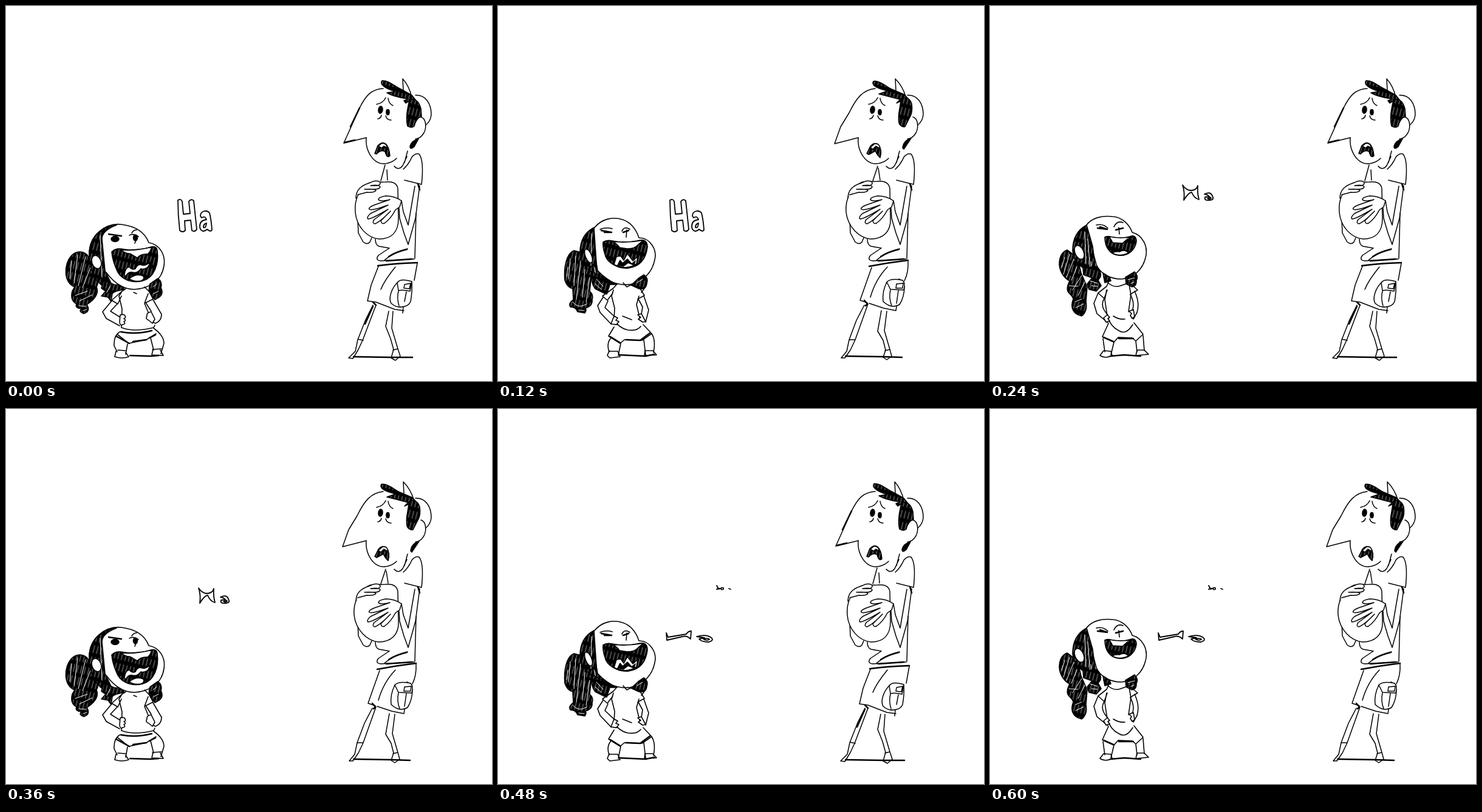
Recreate the animation shown at these times as an HTML page. Size 800 px wide and 618 px high, loop 0.72 s.

```html
<!DOCTYPE html>
<html lang="en">
<head>
<meta charset="utf-8">
<title>Ha</title>
<style>
html, body { margin: 0; height: 100%; overflow: hidden; background: #fff }
svg { display: block; width: 100%; height: 100% }
path, ellipse { fill: none; stroke: #000; stroke-width: 1.5; stroke-linecap: round; stroke-linejoin: round }
#girl path { stroke-width: 1.6 }
#laugh path { stroke-width: 1.8 }
.w { fill: #fff }
.k { fill: #000 }
.i { fill: url(#ink) }
path.b, #girl .b { stroke-width: 2.5 }
#girl .s { stroke: #fff; stroke-width: 1 }
</style>
</head>
<body>
<svg viewBox="0 0 800 618">
<defs>
  <pattern id="ink" width="6" height="19" patternUnits="userSpaceOnUse" patternTransform="rotate(14)">
    <rect width="6" height="19"/>
    <path d="M2 1V13" style="stroke:#fff;stroke-width:.6"/>
  </pattern>
</defs>

<!-- Tall figure: steady parts -->
<g>
  <path d="M593 217C591 238 604 260 622 260Q635 259 643 251"/>
  <path d="M610 162Q621 160 625 151M629 152Q630 161 637 164M612 186Q617 185 618 180M625 181Q627 188 634 188"/>
  <ellipse class="k" cx="616.5" cy="171" rx="3.5" ry="6" transform="rotate(8 616 171)"/>
  <ellipse class="k" cx="628.5" cy="175" rx="2.6" ry="4.5"/>
  <path d="M674 147C690 146 700 160 700 179Q699 190 691 196"/>
  <path d="M683 183C691 185 693 199 688 209Q682 219 674 219"/>
  <path d="M661 239L656 258M639 264Q646 272 653 263L660 248"/>
  <path d="M654 269Q663 261 668 249Q674 242 680 244C687 253 686 276 684 294M656 287L684 294"/>
  <path d="M678 293L681 303" class="b"/>
  <path d="M579 352L580 374L588 389Q595 394 599 389L602 382"/>
  <path d="M675 342L673 416"/>
  <path d="M608 384Q608 394 614 396L631 399L613 411Q607 419 617 420L672 417M661 400Q636 407 623 419"/>
  <path class="b" d="M660 401Q642 405 630 413M626 420L668 417"/>
</g>

<!-- Tall figure: two wobbling versions -->
<g id="man">
  <g>
    <path d="M621 136C601 137 592 148 582 168L556 226L593 217"/>
    <path class="b" d="M582 168L567 199M557 225L574 221"/>
    <path d="M654 139L653 120Q664 132 668 151"/>
    <path class="i" d="M619 123C629 122 639 132 652 138L668 147L676 157L668 154L658 160L655 156L662 153C648 151 635 148 627 143L640 141Q613 132 619 123Z"/>
    <path class="i" d="M664 155Q678 150 683 169L684 182Q675 185 672 198Q667 202 661 198C657 183 662 165 664 155Z"/>
    <path class="k" d="M679 219L672 232Q665 238 665 231Q667 222 679 219Z"/>
    <path class="i" d="M607 243L612 230Q619 223 625 227Q631 233 632 247Q627 252 624 240Q617 236 610 244Z"/>
    <path class="w" d="M613 231L619 226Q626 226 628 234L622 231L618 234Z"/>
    <path d="M624 262L617 288M627 270L628 287"/>
    <path class="w" d="M600 291C582 297 573 320 575 340C577 363 594 382 614 384C635 384 646 372 646 350L645 301Q643 288 625 290Z"/>
    <path class="b" d="M612 428Q642 424 677 423"/>
    <path d="M613 429L601 460L595 486L609 488M609 488L640 500L655 502M677 424L672 452M641 430Q623 452 617 467M654 495L653 506"/>
    <path class="b" d="M604 488L609 493"/>
    <path class="w" d="M644 456C635 465 629 481 634 490Q642 497 651 496Q663 495 666 487Q669 470 668 456Z"/>
    <path class="w" d="M644 456Q649 448 668 454L665 470Q653 467 646 469ZM656 459L666 457L664 466L655 465Z"/>
    <path d="M646 470Q643 481 647 494M659 471L656 487"/>
    <path d="M604 493L592 517L579 550L575 569L564 580L571 581L580 566L587 551L609 493M579 549L588 551"/>
    <path class="b" d="M604 495L591 524M572 578L634 579L669 579"/>
    <path d="M630 503L625 528L633 548L638 566L634 580L641 584L649 577L645 565L635 531L637 503M637 567L645 565"/>
  </g>
  <g>
    <path d="M621 136C601 138 590 151 578 176L564 199L554 227L593 217"/>
    <path d="M655 139L654 120Q666 132 671 149"/>
    <path class="i" d="M618 124C627 122 638 132 648 137L669 146L679 157L667 155L656 160L662 154L627 145L641 140Q612 133 618 124Z"/>
    <path class="i" d="M663 153Q676 147 681 161Q683 175 678 183L670 199Q663 200 660 193C657 178 663 167 663 153Z"/>
    <path class="k" d="M680 218L668 236L666 234Q667 222 680 218Z"/>
    <path class="i" d="M607 243L613 231Q619 224 626 228Q633 237 629 250Q625 247 621 239L610 245Z"/>
    <path class="w" d="M613 233L620 227Q628 226 629 235L622 231L617 236Z"/>
    <path d="M625 264L617 288M626 267L629 287"/>
    <path class="w" d="M600 290C582 297 571 318 573 340C576 364 594 382 613 384C634 384 647 372 646 350L645 301Q643 287 624 289Z"/>
    <path class="b" d="M611 429Q642 423 675 419"/>
    <path d="M615 431L603 465L596 485L608 489M611 490L635 498L655 502L656 495M675 420Q676 439 669 453M641 430Q621 451 613 480"/>
    <path class="b" d="M603 485L608 491L605 494"/>
    <path class="w" d="M640 455Q632 471 634 487Q648 500 661 492Q669 479 669 462L661 450Z"/>
    <path class="w" d="M640 455Q646 448 666 452Q671 457 668 468L646 467ZM656 458L667 457L666 465L655 465Z"/>
    <path d="M646 468Q643 481 648 494M659 469L656 490"/>
    <path d="M603 493L590 518L578 550L574 569L565 580L571 580L580 567L588 550L609 491M578 550L587 550"/>
    <path class="b" d="M572 577L634 578L665 579"/>
    <path d="M631 502L625 536L634 551L638 567L634 579L640 583L648 577L645 566L636 535L640 503M637 568L645 566"/>
  </g>
</g>

<!-- Hands and near arm -->
<g>
  <path class="w" d="M576 317C576 304 583 296 600 291Q606 287 614 289Q619 293 612 296L600 296Q614 294 616 298Q615 302 606 302L590 302Q608 301 609 304Q606 308 594 307L579 311"/>
  <path class="w" d="M648 331L651 321Q640 313 625 313Q613 315 613 319Q616 323 632 319L606 328Q596 332 598 335Q602 338 629 328L600 342Q593 348 596 351Q602 351 629 335L606 352Q602 358 607 359Q617 355 633 338L617 354Q618 360 623 358Q634 350 641 336L648 331"/>
  <path d="M651 321L654 339L662 361L673 297M647 333L648 350L655 374L662 393L674 350L681 296"/>
</g>

<!-- Laughing girl: crouch, bounce, stretch -->
<g id="girl">
  <g>
    <path class="i" d="M108 411C119 400 136 405 138 420L147 446Q154 455 149 463Q154 475 140 487L133 492Q140 503 128 507Q119 504 124 499Q113 498 116 491Q105 485 109 470L113 463C95 457 94 426 108 411Z"/>
    <path class="s" d="M108 420L105 449M118 410L112 457M131 413L119 461M139 431L126 464M114 477L134 470M121 486L142 476M120 494L131 495M127 502L133 500"/>
    <path class="w" d="M137 410C136 378 164 357 190 360C215 363 229 374 235 390C253 393 263 410 260 428C257 448 243 459 228 464C199 474 178 457 165 439Z"/>
    <path class="i" d="M137 413C136 386 150 365 182 361Q158 370 158 384L163 436L175 461Q167 468 160 462C144 451 138 431 137 413Z"/>
    <path class="s" d="M155 378L158 447M160 383L165 438"/>
    <ellipse class="w" cx="149" cy="422" rx="7.5" ry="11" transform="rotate(-20 149 422)"/>
    <path class="i" d="M161 452L178 459Q190 459 195 467L186 469Q179 470 175 474L173 487L168 480L157 478L164 470L157 465Z"/>
    <path class="i" d="M237 458L250 449Q258 455 255 464Q260 474 252 480L245 484L239 476Q233 470 237 458Z"/>
    <path class="s" d="M166 472L171 462M242 463L248 458M243 474L251 470"/>
    <path class="b" d="M169 376L190 379"/>
    <ellipse class="k" cx="179.500" cy="384" rx="6.500" ry="4.500"/>
    <ellipse class="k" cx="213" cy="382" rx="3.5" ry="5"/>
    <path d="M203 378Q208 374 218 380M207 374Q210 369 215 369M214 386L212 391"/>
    <path class="i" d="M174 405C185 396 193 402 205 402Q229 401 239 397Q248 395 249 403C252 425 244 448 225 453C205 458 187 450 181 432Q175 418 174 405Z"/>
    <path class="w" d="M190 402Q196 408 204 408L216 415Q223 408 233 409Q238 405 240 397Q215 404 190 402Z"/>
    <path class="w" d="M195 443Q196 431 203 430Q208 436 213 433Q217 424 224 427Q230 429 239 421L233 431Q226 435 222 433Q216 441 209 439Q201 437 197 446Z"/>
    <path class="w" d="M203 449Q215 440 226 445Q229 450 222 453Q210 455 203 449Z"/>
    <path d="M197 466L191 470L174 485L184 491L190 478M191 470L186 478L191 499L190 530M190 530Q211 538 243 530L245 526M228 463L236 471L242 483L230 489M234 474L228 490L235 507M210 472L215 474"/>
    <path d="M174 486L159 504L165 515L187 527M183 491L172 503L188 513"/>
    <path class="w" d="M188 509Q195 507 196 511Q198 514 194 515Q199 518 194 520Q198 524 192 525Q188 528 187 521Z"/>
    <path d="M242 484L256 508Q256 519 246 523L240 520M230 489L239 503"/>
    <path class="w" d="M239 504Q231 505 232 511Q229 516 235 518L241 523L245 516Z"/>
    <path class="b" d="M189 537Q214 542 240 535"/>
    <path d="M187 537Q177 544 178 560L183 570M183 541L202 556L231 550L247 540M243 531Q260 543 260 556L255 573M200 557L197 574M238 547L243 567"/>
    <path class="b" d="M181 544L203 556M209 553L231 550M236 547L246 542"/>
    <path d="M181 569L179 578Q191 582 202 578L197 571M184 567L197 568M242 566L240 575L259 576L254 567M241 566L256 565"/>
    <path class="b" d="M204 576L238 577L251 576"/>
  </g>
  <g>
    <path class="i" d="M125 403C112 408 108 432 110 452Q114 464 123 466L124 484Q115 490 119 496Q128 496 131 504L143 506Q147 500 143 498Q156 495 155 484Q158 476 151 470L154 440L137 406Z"/>
    <path class="s" d="M119 416L116 450M128 412L125 461M136 420L129 483M143 434L139 480M151 447L145 488M123 488Q133 500 146 491M115 430L113 446M133 501L142 502"/>
    <path class="w" d="M158 366C171 350 190 347 205 352C220 357 228 370 232 382C251 382 262 402 258 418C253 444 230 462 204 459Q180 456 163 438Z"/>
    <path class="i" d="M158 365C141 374 135 388 135 406C136 422 145 435 160 442L167 464L179 475L184 459L196 459Q177 450 164 436Q157 401 158 365Z"/>
    <path class="s" d="M154 375L153 428M158 430L164 451M167 447L181 463"/>
    <ellipse class="w" cx="149" cy="412" rx="5" ry="12" transform="rotate(-22 149 412)"/>
    <path class="i" d="M154 437L166 444L180 451L183 463L176 474L160 466Q152 456 154 437Z"/>
    <path class="i" d="M231 449L240 443Q248 448 245 457Q244 468 232 466L219 460Z"/>
    <path class="s" d="M162 450L173 462M160 458L170 467M229 456L238 450"/>
    <path d="M168 368Q178 364 188 367M204 371Q208 362 217 368M212 369L211 381"/>
    <path class="b" d="M170 370L187 373L175 373M206 373L215 370"/>
    <path class="i" d="M173 389Q179 385 188 387Q207 391 229 387Q246 382 246 397C244 414 236 429 215 432C197 434 178 422 176 409Q172 397 173 389Z"/>
    <path class="w" d="M187 388Q196 391 200 398L213 400Q226 400 231 393L239 386Q213 391 187 388Z"/>
    <path class="w" d="M191 426L195 413L202 412L207 419L213 408L222 420L230 413L228 425Q211 436 191 426Z"/>
    <path class="k" d="M197 427L201 419L205 424L213 417L220 425L226 420L224 427L214 423L206 429Z"/>
    <path d="M196 458L190 465L172 478L180 485L189 473M190 468L187 478L192 498L191 517Q199 531 214 534Q229 536 235 528M206 456L212 463L220 459L230 463L242 464L236 472M231 461L241 477L230 483M232 478L228 492L233 513M205 511L220 517"/>
    <path d="M173 480L164 494L168 505L186 524L197 525M181 486L176 497L192 512"/>
    <path class="w" d="M191 511L197 514L194 518L199 520L195 525L186 524Z"/>
    <path d="M240 478L248 501L243 521M231 483L238 496L236 508"/>
    <path class="w" d="M236 507L230 509L235 513L231 516L238 521L243 520Z"/>
    <path d="M191 529L182 544L201 556L208 550L237 551L253 540L239 525M186 547Q178 556 183 570M253 540Q260 551 256 571M202 556L198 576M240 550L243 575"/>
    <path class="b" d="M185 545L201 555M211 550L234 551L250 539"/>
    <path d="M183 568L180 576L184 580L201 578L197 569L183 569M242 568L241 576L261 575L255 568Z"/>
    <path class="b" d="M200 575L243 577L257 574"/>
  </g>
  <g>
    <path class="i" d="M127 402Q114 407 114 426C115 440 124 450 131 453Q124 467 130 473Q137 480 137 483C131 498 138 508 151 511Q161 503 158 487L160 463L150 440L144 415Z"/>
    <path class="s" d="M123 414L118 431M131 409L121 442M138 417L126 447M143 430L134 452M151 444L136 468M156 455L145 477M141 487L151 483M141 497L154 491M130 461L145 462"/>
    <path class="w" d="M158 362C167 349 184 345 202 347C218 348 230 361 234 373C252 378 259 396 257 410C253 435 235 449 216 450C196 450 181 440 175 426Z"/>
    <path class="i" d="M159 361C142 370 136 386 136 403C137 418 147 429 156 433L165 445Q175 451 180 440L173 429L169 396Z"/>
    <path class="s" d="M156 372L158 425M161 384L165 437M166 421L168 439"/>
    <ellipse class="w" cx="147" cy="406" rx="7" ry="12" transform="rotate(-24 147 406)"/>
    <path class="i" d="M153 432L175 429Q184 437 182 446L178 452L183 461L175 470L163 467L160 458L168 448L154 443Z"/>
    <path class="i" d="M186 440L197 447L199 453L189 456ZM223 447L238 438Q245 445 241 452Q242 461 234 463L224 458Z"/>
    <path class="s" d="M165 453L177 457M167 461L177 462M227 451L238 448M230 458L237 455"/>
    <path d="M175 361Q186 358 194 366M204 364Q209 353 219 357M212 365L213 376"/>
    <path class="b" d="M177 366L193 368L181 364M207 369L219 366"/>
    <path class="i" d="M189 381Q193 378 201 381Q220 384 233 379Q241 378 241 388C239 403 227 412 212 411C197 410 189 397 189 381Z"/>
    <path class="w" d="M196 380Q200 386 202 390L218 391L226 384L237 380Q215 384 196 380Z"/>
    <path class="w" d="M201 407Q207 404 213 405Q222 400 228 407Q213 414 201 407Z"/>
    <path d="M187 447L195 455L192 462L178 473L188 482L193 468M194 456Q204 465 215 461L229 456L243 468L231 475M192 468L189 484L193 511Q198 528 212 535Q224 543 235 525M229 459L232 476L228 504M203 511Q212 517 222 516"/>
    <path d="M178 473L171 490L176 507L194 522M188 482Q180 495 194 509"/>
    <path class="w" d="M193 509L197 513L194 515L197 519L191 521L187 514Z"/>
    <path d="M238 470Q247 489 242 505L236 516M231 476Q238 488 235 499"/>
    <path class="w" d="M236 500L229 503L233 507L231 510L234 515L238 512Z"/>
    <path d="M195 523L185 545L204 554L211 546L234 547L240 552L252 541L237 522M186 548L189 570M204 554L199 575M240 552L242 570M252 543L254 568"/>
    <path class="b" d="M187 546L203 553M212 548L236 548"/>
    <path d="M187 568L181 576Q190 582 201 576L199 569ZM242 567L240 576L261 574L254 567Z"/>
    <path class="b" d="M198 577L221 575L248 577"/>
  </g>
</g>

<!-- Drawn laugh: full, squashed, flat with the old one shrinking away -->
<g id="laugh">
  <g>
    <path d="M283 320Q288 317 290 322L292 343L303 342L301 322Q305 317 309 321L314 368Q311 373 306 370L304 353L294 354L295 370Q291 374 286 370Q283 345 283 320Z"/>
    <path d="M320 346C320 338 330 335 335 341Q338 353 339 369Q337 373 331 368C325 374 319 370 319 363Q319 353 330 352Q328 345 322 349ZM330 358Q325 359 325 365Q329 367 330 358Z"/>
  </g>
  <g>
    <path d="M317 295Q322 303 330 304Q340 304 342 296Q341 308 344 319Q336 317 332 307Q327 307 319 320Q321 307 317 295Z"/>
    <path d="M353 310Q363 305 366 313Q370 320 361 320Q352 321 354 315L361 314Q357 310 353 310ZM358 317Q364 314 364 317Q361 319 358 317Z"/>
  </g>
  <g>
    <path d="M277 369L280 376L310 371Q313 366 318 366L317 379Q311 373 304 375L278 381Z"/>
    <path d="M327 375Q342 371 350 376Q357 381 347 384Q335 384 331 379L340 377ZM338 379Q347 377 348 380Q342 382 338 379Z"/>
    <path d="M360 291L362 295L366 296L360 297M367 295Q372 293 371 297Q367 299 367 295ZM380 296L383 297"/>
  </g>
</g>
</svg>
<script>
const STEP = 120;

function show(id, n) {
  [...document.getElementById(id).children].forEach((pose, i) => {
    pose.style.display = i === n ? '' : 'none';
  });
}

function draw() {
  const step = Math.floor(performance.now() / STEP) % 6;
  show('girl', step % 3);
  show('man', step % 2);
  show('laugh', step >> 1);
  requestAnimationFrame(draw);
}
draw();
</script>
</body>
</html>
```
